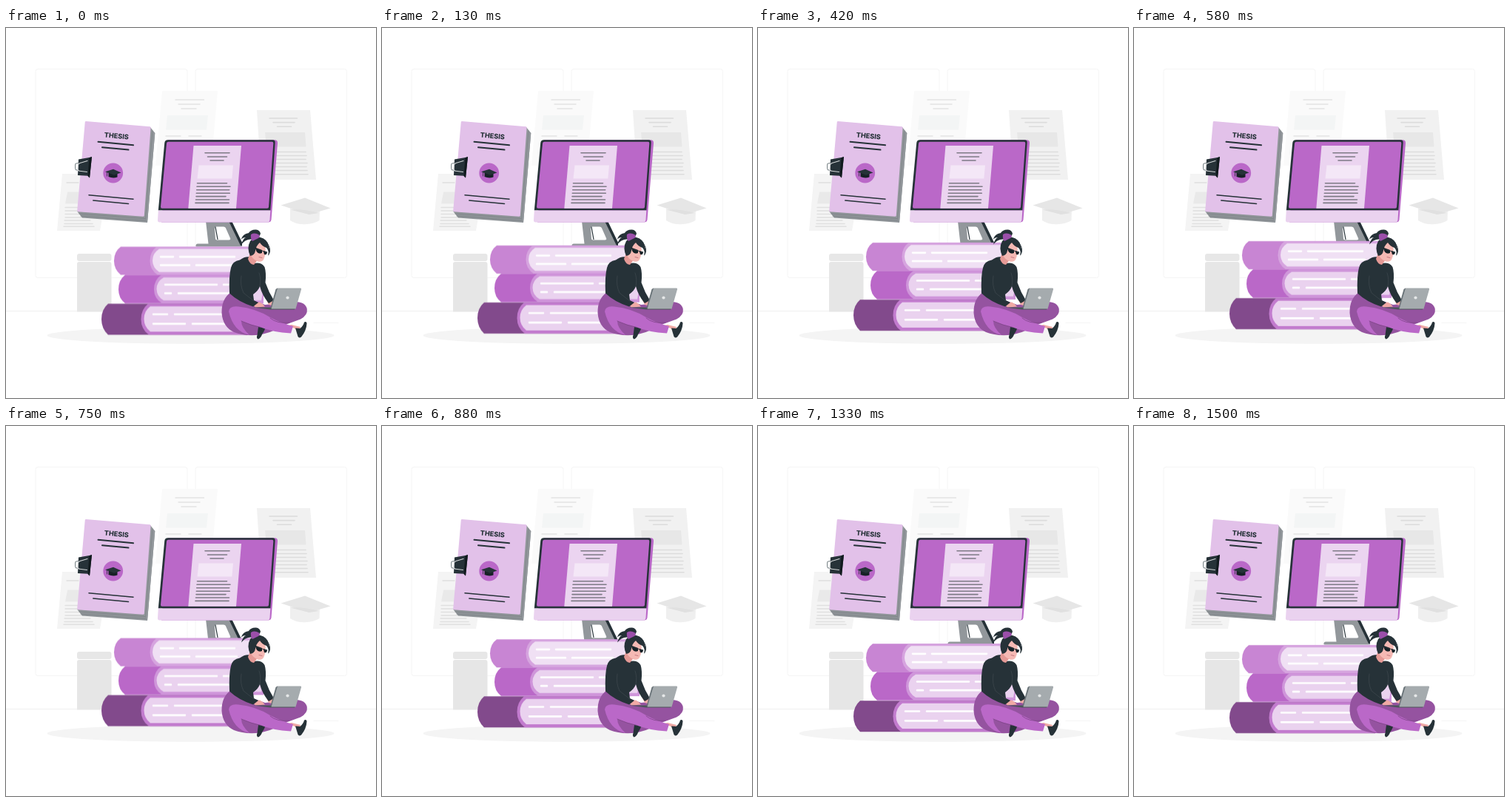
Recreate the animation shown at these times as an HTML page. Size 500 by 500 pixels, loop 1.54 s.

```html
<!DOCTYPE html>
<html lang="en">
<head>
<meta charset="utf-8">
<title>Thesis</title>
<style>
html, body { margin: 0; width: 100%; height: 100%; overflow: hidden; background: #fff; }
svg { display: block; width: 100vw; height: 100vh; }
.line { fill: none; stroke-linecap: round; stroke-linejoin: round; }
.books { animation: bob 1540ms linear -51ms infinite; }
@keyframes bob {
  50% { transform: translateY(-10px); }
}
.title { font: 800 9.1px Inter, "Open Sans", sans-serif; fill: #263238; text-anchor: middle; }
</style>
</head>
<body>
<svg viewBox="0 0 500 500">
  <!-- room -->
  <g class="line" stroke="#f5f5f5" stroke-width="1">
    <rect x="40" y="55.5" width="205" height="282" rx="3"/>
    <rect x="256" y="55.5" width="204.500" height="282" rx="3"/>
    <path d="M0 382.500H500" stroke="#efefef"/>
    <path d="M416 398.500h33"/>
  </g>
  <ellipse cx="249.500" cy="415.500" rx="194" ry="11.300" fill="#f4f4f4"/>

  <!-- sheets on the wall -->
  <path d="M76 197H140L127 274H69Z" fill="#f4f4f4"/>
  <path d="M83 221.500H106L103 237.500H80Z" fill="#e9e9e9"/>
  <path class="line" stroke="#e0e0e0" stroke-width="1.500" d="M82 209h16M80 242.500h24M80 247h22M80 251.500h20M80 256h25M79 260h35M79 264.500h38M78 268.300h41"/>
  <path d="M211 85H286L277 186H202Z" fill="#fafafa"/>
  <path d="M218 118H273L271 137.500H216Z" fill="#f3f5f5"/>
  <path class="line" stroke="#e4e4e4" stroke-width="1.600" d="M229 97h38.500M233 103h29M237 109h20M216 146h20M247 146h17"/>
  <path d="M339 111H411L419 205H345Z" fill="#f1f1f1"/>
  <path d="M350 141H404L405.500 160.500H352Z" fill="#e7e7e7"/>
  <path class="line" stroke="#dcdcdc" stroke-width="1.600" d="M356 122h37.500M361 127.600h29M366.500 133.200h19M352 167.500h53M352 172.500h54M352 177.500h53M352 182.500h55M352 187.500h54M352 192.500h55M352 197.700h56"/>

  <!-- pale cap and bin -->
  <path d="M384 244V260Q392 265.500 404 265.200Q416 265 423.500 260L424 246Z" fill="#efefef"/>
  <path d="M371.500 239.500L404 229.500L438.500 243.500L409.500 252Z" fill="#e6e6e6"/>
  <path d="M384 245.500Q403 244 423 250L409.500 252Z" fill="#e0e0e0"/>
  <rect x="96" y="305" width="46.500" height="10" rx="3" fill="#e7e7e7"/>
  <path d="M99 316H139.500Q142.500 316 142.500 319V383.500H96V319Q96 316 99 316Z" fill="#e6e6e6"/>

  <!-- thesis -->
  <path d="M193 133.500L201.300 142L191 263L103 256.500L96 247.500L186 254Z" fill="#8f9498"/>
  <path d="M195 134L201.300 142L191 263L186 254.500Z" fill="#92979b"/>
  <path class="line" stroke="#7a8084" stroke-width=".7" d="M198 139L188.500 258.500M99 251L187.500 257.500M101 254L189 260.500"/>
  <path d="M108 126L194.500 133.300Q195.700 133.500 195.600 134.700L186.800 253.500Q186.600 255 185 254.800L97.300 248.200Q96 248 96.200 246.700L106.800 127Q107 126 108 126Z" fill="#e2c1e9"/>
  <text class="title" transform="translate(149 149) rotate(5)">THESIS</text>
  <path class="line" stroke="#263238" stroke-width="2" d="M124.500 153.800L172 158.300M130 161.300L165.500 164.600"/>
  <path class="line" stroke="#263238" stroke-width="1.500" d="M112 225.700L172 231.300M117.800 233L165.500 237.400"/>
  <circle cx="144.700" cy="196" r="13.400" fill="#ba68c8"/>
  <path d="M138.500 196V201Q144.500 203.700 150.500 201.500V196Z" fill="#172126"/>
  <path d="M134 194.300L145 190.700L155.500 195.500L146 198.800Z" fill="#263238"/>
  <path class="line" stroke="#263238" stroke-width=".8" d="M136.500 195V200"/>
  <path d="M98 177.500L112.500 175L116 174L113 202.500L110.500 199.800L97 199Z" fill="#263238"/>
  <path d="M112.500 175.500L116 174L113 202.500L110.500 200Z" fill="#111a1e"/>
  <g class="line" stroke-width="1.100">
    <path stroke="#7b8589" d="M98 182.500L95 183Q93.600 183.300 93.600 185V189.500Q93.700 191.800 95.500 192L98 192.300"/>
    <path stroke="#d6d9da" d="M110 179.500L100 182.500Q97.500 183.300 97.400 185.500L97 190.500Q97 193 99.500 193.300L109.500 194.500"/>
  </g>

  <!-- monitor -->
  <path d="M270 261H305L319 290V295.500H257.500Q256 295.500 256.500 293.500Q257 291.500 259 291.500H273.500Z" fill="#92979b"/>
  <path d="M301 261H305L319 290V294H317Z" fill="#263238"/>
  <path d="M284 268.500H294Q296 268.500 296.800 270L303 284Q304 286.500 301 286.500H285Q283 286.500 283 284.500L282 271Q282 268.500 284 268.500Z" fill="#fff"/>
  <path class="line" stroke="#263238" stroke-width="1.200" d="M283 269L286 285.500"/>
  <path d="M219 151.300H363Q367.500 151.500 367 156L358.500 259Q358 262.500 354 262.500H210Z" fill="#ba68c8"/>
  <path d="M218.500 151.200H360.500Q364 151.300 363.700 155L357.300 246.500H205.800L214.300 155Q214.800 151.300 218.500 151.200Z" fill="#263238"/>
  <path d="M219.500 153.700H359.500Q361.500 153.700 361.300 156L355 242Q354.900 243.700 353 243.700H211Q208.800 243.700 209 241.500L217 156Q217.200 153.700 219.500 153.700Z" fill="#ba68c8"/>
  <path d="M205.800 246.500H357.300L356.500 259Q356.200 262.500 353 262.500H207.500Q204.800 262.500 205 259.500Z" fill="#ead2ef"/>
  <path d="M253.500 159H318L311 243.700H246.300Z" fill="#ebd4f0"/>
  <path d="M260.500 185.500H307L305.300 203.500H258.500Z" fill="#f4e7f7"/>
  <path class="line" stroke="#7e7b86" stroke-width="1.600" d="M269 168.700h33M272.500 174h26M276 179h18M258.500 209.800h40M258 214.300h45M257.700 218.800h44M257.300 223.200h45M257 227.600h40M256.500 232h45M256 236.400h45"/>

  <!-- books -->
  <g class="books">
    <g transform="translate(0 .66)">
      <path d="M155 295.500H334V333.500H155Q146 326 146 314.500Q146 302 155 295.500Z" fill="#c885d3"/>
      <path d="M203.500 295.500H334V333.500H205Q194.500 327 194.500 314.500Q194.500 302 203.500 295.500Z" fill="#d6a4df"/>
      <path d="M207 298.500H334V329.800H207Q198 324 198 314.200Q198 304 207 298.500Z" fill="#f0e0f4"/>

      <path d="M161 333.500H348V372H161Q152 365 152 353Q152 340.500 161 333.500Z" fill="#ba68c8"/>
      <path d="M210 333.500H348V372H211Q200 365.500 200 353Q200 340 210 333.500Z" fill="#cf95da"/>
      <path d="M213 337H345Q349 352 345 368H213Q203.500 362.500 203.500 352.500Q203.500 342.500 213 337Z" fill="#ead2ef"/>

      <path d="M138 372.500H326V414.500H138Q129 406 129 393.500Q129 380 138 372.500Z" fill="#824a8c"/>
      <path d="M192 372.500H326V414.500H193Q182.500 407 182.500 393.500Q182.500 380 192 372.500Z" fill="#c27bce"/>
      <path d="M195 376.200H326V410.300H195Q186.500 404 186.500 393.200Q186.500 382.500 195 376.200Z" fill="#ead2ef"/>

      <path class="line" stroke="#fff" stroke-width="2.600" d="M209 309.200H226M235 309.200H309M209 320.500H248M257 320.500H312M215 346.900H285M294 346.900H312M215 358.500H223M233 358.500H312M199 386.900H218M228 386.900H312M199 399.700H242M252 399.700H312"/>
    </g>
  </g>

  <!-- reader -->
  <path d="M304 357Q291 366 291.500 385Q293 404 308 411Q320 416 338 415Q358 413 372 403L398 393.500Q408 388 406.800 380Q405 370 391 370L350 374Z" fill="#9553a0"/>
  <path d="M341 404L351 402Q350 409 346.500 413Q344 420 340.500 420.500Q338 419 339.500 415Z" fill="#263238"/>
  <path d="M381 402L391 406.500L396 411L398 404L386 401Z" fill="#f0aaa5"/>
  <path d="M301 383Q302 375 314 376.500Q338 379 357 391Q372 399 388 403L385 412.500Q360 411 343 404Q331 401 318 396Q318 405 329 415Q307 410 301 383Z" fill="#ba68c8"/>
  <path class="line" stroke="#81468b" stroke-width=".8" d="M318 396Q331 402 344 404.500M383 398Q366 400 357 392"/>
  <path d="M391 405.500L397.500 406Q402 402 403 397.500Q406 396 406.500 399Q406 409 399 417.500Q396 419.500 394.500 417Z" fill="#263238"/>

  <path d="M332 372L343 370.500Q348 373 350 376.500L337 377.500Z" fill="#f0aaa5"/>
  <path d="M352 368L362 368L363 376L355 374Z" fill="#f0aaa5"/>
  <path d="M316 313.500Q323 308 330 309.500L335 318Q345 316 349.500 323Q352 331 350.500 344Q355 357 362 368L355 372Q346 361 343 349Q341 355 334 360L335 368L341 371L334 376.500Q314 370 302 358.500Q301 335 304 324Q306 315 316 313.500Z" fill="#263238"/>
  <path class="line" stroke="#3f4a50" stroke-width=".7" d="M318 335Q316 348 321 358L335 369M343 349Q345 339 342 331"/>

  <path d="M330 304L341 312L335 320Q329 319 327 312Z" fill="#e59a96"/>
  <path d="M333 290Q343 287 350 294Q352 303 348.500 312Q346 317 340 315.500Q332 312 329 303Z" fill="#f5b9b4"/>
  <path d="M330 308Q325 297 330 288Q337 279 348 284.500Q355 289 355 296Q359 302 354 308Q356 301 352 297Q346 295 343 290Q338 294 337 301Q336 307 330 308Z" fill="#263238"/>
  <path d="M334 286Q325 284 318 292.500Q320 285 324 283Q320 283 317.500 286Q320 278 328 277Q331 272 338 272.500Q343 273 344 278Q342 284 334 286Z" fill="#263238"/>
  <path d="M331 279Q336 276 342 279.500Q344 282 341 284L333 288Q330 284 331 279Z" fill="#9b4faa"/>
  <path d="M336.500 296.500L346 300V304Q341 306 338.500 302ZM347.500 301L353 302.500Q352.500 307.500 349 306Z" fill="#162126"/>
  <path class="line" stroke="#263238" stroke-width="1" d="M333 297L352 303M353 291Q359 298 355 306"/>
  <path class="line" stroke="#b86670" stroke-width=".8" d="M342 309.500L346 310.500"/>

  <!-- laptop -->
  <path d="M334 377.500H360L391 378.500L390 380.500H357Z" fill="#4c555a"/>
  <path d="M367 351.500H398Q399.500 351.700 399 353.200L391.500 379.500H358.500L365.300 353Q365.700 351.500 367 351.500Z" fill="#a5abae"/>
  <path d="M367 351.500L358.500 379.500L357.500 378L364.500 353Z" fill="#687277"/>
  <circle cx="380.500" cy="364.500" r="2.100" fill="#e5e7e8"/>
</svg>
</body>
</html>
```
